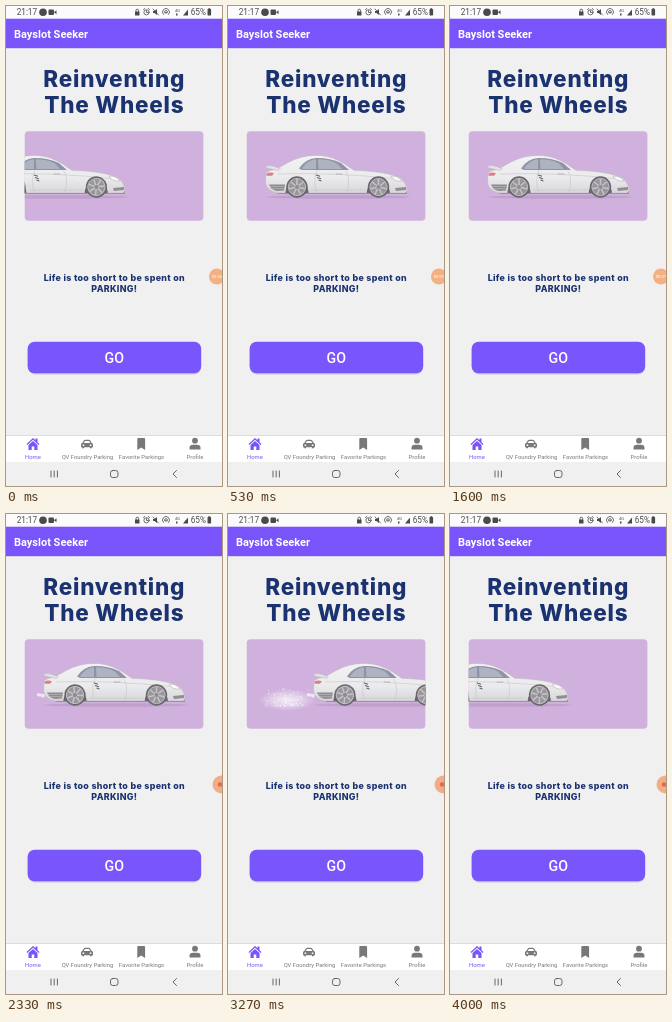
Write an HTML page that moves like this. It is 216 px wide and 480 px high and loops after 4.07 s.

```html
<!DOCTYPE html>
<html lang="en">
<head>
<meta charset="utf-8">
<title>Parking app</title>
<style>
  html, body { margin: 0; width: 100%; height: 100%; overflow: hidden; background: #f0f0f0; }
  svg { display: block; width: 100vw; height: 100vh; font-family: Roboto, sans-serif; }
  .heading { font-family: Inter, sans-serif; font-weight: 800; letter-spacing: .035em; fill: #1b3270; text-anchor: middle; }
  .tab { font-size: 5.9px; text-anchor: middle; }
  .line { fill: none; stroke-linecap: round; stroke-linejoin: round; }
</style>
</head>
<body>
<svg viewBox="0 0 216 480" preserveAspectRatio="none">
  <defs>
    <clipPath id="card"><rect x="18.700" y="125.200" width="178.700" height="89.600" rx="4"/></clipPath>
    <linearGradient id="paint" x2="0" y2="1">
      <stop offset="0" stop-color="#f3f2f3"/>
      <stop offset=".6" stop-color="#ebeaec"/>
      <stop offset="1" stop-color="#d8d6da"/>
    </linearGradient>
    <radialGradient id="haze">
      <stop offset="0" stop-color="#fff" stop-opacity=".75"/>
      <stop offset=".5" stop-color="#fff" stop-opacity=".4"/>
      <stop offset="1" stop-color="#fff" stop-opacity="0"/>
    </radialGradient>
    <g id="wheel">
      <circle r="10.700" fill="#69676c"/>
      <circle r="8.600" fill="#98969a" stroke="#bfbdc1" stroke-width="1"/>
      <g id="spokes" stroke="#c6c4c8" stroke-width="1.500"></g>
      <circle r="2" fill="#8d8b90"/>
    </g>
  </defs>

  <rect width="216" height="480" fill="#f0f0f0"/>

  <!-- Status bar -->
  <rect width="216" height="13" fill="#fbfbfb"/>
  <g fill="#4a4a4a" transform="translate(0 -.5)">
    <text x="10.700" y="9.500" font-size="8.200">21:17</text>
    <circle cx="37" cy="6.700" r="3.800"/>
    <rect x="42.500" y="4" width="5.500" height="5.500" rx="1"/>
    <path d="M48 6.700l2.500-2v4z"/>
    <rect x="129" y="6" width="4.500" height="4" rx=".6"/>
    <path d="M130 6v-1a1.300 1.300 0 0 1 2.600 0v1" class="line" stroke="#4a4a4a" stroke-width=".9"/>
    <g class="line" stroke="#4a4a4a" stroke-width=".8">
      <circle cx="140.500" cy="6.800" r="2.600"/>
      <path d="M140.500 5.200v1.800h1.200M137.500 4l1.300-1M143.500 4l-1.300-1"/>
      <path d="M147 3.500l5.500 6"/>
      <path d="M157.500 9a3.500 3.500 0 1 1 5 0M158.800 7.500a1.500 1.500 0 1 1 2.400 0"/>
    </g>
    <path d="M147 5.500h1.500l2.500-2v6l-2.500-2h-1.500z"/>
    <circle cx="160" cy="7.300" r=".8"/>
    <text x="169" y="6.500" font-size="4">4G</text>
    <path d="M170 8h1.500v2h-1.500zM177 10l5-6v6z"/>
    <text x="184.700" y="9.500" font-size="8.200">65%</text>
    <rect x="201.500" y="3.500" width="3.600" height="6.500" rx=".7"/>
    <rect x="202.400" y="2.700" width="1.800" height="1"/>
  </g>

  <!-- Header and headline -->
  <rect y="12.700" width="216" height="29.500" fill="#7854fa"/>
  <text x="8" y="32" font-size="11" font-weight="700" fill="#fff">Bayslot Seeker</text>
  <text class="heading" x="108.300" y="80.600" font-size="22.500">Reinventing</text>
  <text class="heading" x="108.300" y="107.200" font-size="22.500">The Wheels</text>

  <!-- Animated card -->
  <g clip-path="url(#card)">
    <rect x="18" y="125" width="180" height="90" fill="#d0b1dd"/>
    <g id="car">
      <ellipse cx="110" cy="191" rx="72" ry="1.800" fill="#8b6f99" opacity=".25"/>
      <g id="exhaust" fill="#f6edf4" opacity=".85">
        <ellipse cx="35" cy="181" rx="4" ry="1.500"/>
        <circle cx="32.500" cy="180.500" r="1.600"/>
        <circle cx="37" cy="182" r="1.700"/>
      </g>
      <path d="M47 184h131l1 4h-128q-3-1-4-4z" fill="#8b898f"/>
      <path d="M38 167Q41 164 48 163C57 159.500 66 150 87 149.500C104 149 114 156 126 164.300C144 165 164 167 173 172.500Q179 178 179 184L177.500 187H49Q39 185 37.500 177Z"
            fill="url(#paint)" stroke="#b7b4bb" stroke-width=".5"/>
      <path d="M37.500 160q4-1 9 .5l6 2.500-2 1.500-12-2.500z" fill="#e4e2e6" stroke="#b0adb4" stroke-width=".4"/>
      <path d="M71 162.500Q77 153 88 152Q101 151.500 113 157L121 164L74 164Z" fill="#8f93a5"/>
      <path d="M74 162Q80 154 88 153.300V163H75ZM90 153.300Q100 153 109 157.500L114 163H90.500Z" fill="#aeb3c1"/>
      <g class="line" stroke="#bfbdc3" stroke-width=".5">
        <path d="M89 164q-4 9-1 21M118 165q5 9 1 20M50 168q55-2 120 5M84 184h53"/>
        <path d="M108 168h6" stroke="#aaa8ae" stroke-width=".8"/>
      </g>
      <path d="M88 169l4 1.300M89 171.500l4 1.300M90.500 174l3 1" stroke="#65636a" stroke-width="1.200"/>
      <path d="M38.500 167.500q4-2 7.500 0l-2 2.300h-5.500z" fill="#de7f83"/>
      <path d="M41 178.500h16l-1 6-7 .5q-6-1-8-6.500z" fill="#8d8b91"/>
      <path d="M42 180.500h14M44 182.700h12" stroke="#c3c1c6" stroke-width=".6"/>
      <path d="M163 170q8 0 11 5-8 1-11-5z" fill="#fafafb" stroke="#a7a5ab" stroke-width=".5"/>
      <path d="M167 182l11-1v3l-10 1z" fill="#908e94"/>
      <path d="M57.500 187a11.500 12.500 0 0 1 23 0zM138.800 187a11.500 12.500 0 0 1 23 0z" fill="#69676c"/>
      <use id="rear" href="#wheel"/>
      <use id="front" href="#wheel"/>
    </g>
    <g id="dust"><ellipse cx="59" cy="186" rx="28" ry="11" fill="url(#haze)"/></g>
  </g>

  <text class="heading" x="108.300" y="275.200" font-size="8.900">Life is too short to be spent on</text>
  <text class="heading" x="108.300" y="285.900" font-size="8.900">PARKING!</text>

  <!-- Button -->
  <rect x="22" y="337.300" width="173" height="31.200" rx="7" fill="#777" opacity=".3"/>
  <rect x="21.600" y="335.700" width="173.600" height="31.500" rx="7" fill="#7955fc"/>
  <text x="108.300" y="357.400" font-size="14.200" font-weight="500" fill="#fff" text-anchor="middle">GO</text>

  <!-- Recorder bubble -->
  <g id="timer">
    <circle cx="211" cy="270.500" r="8" fill="#f3b183"/>
    <text id="seconds" x="205.700" y="272" font-size="4.200" fill="#fff"></text>
  </g>
  <g id="docked">
    <circle cx="215.500" cy="270.500" r="9" fill="#f3ad86"/>
    <circle cx="214" cy="270.500" r="2.200" fill="#e2694d"/>
  </g>

  <!-- Tabs -->
  <rect y="429" width="216" height="27" fill="#fff"/>
  <path d="M0 429.500h216" stroke="#d3d3d3" stroke-width=".8"/>
  <g fill="#7854fa">
    <path d="M20.500 438l6.500-6 2.500 2.300v-1.800h2v3.700l2 1.800-.8 1-5.700-5.200-5.700 5.200z"/>
    <path d="M22.500 439l4.500-4 4.500 4v5h-3.200v-3.500h-2.600v3.500h-3.200z"/>
    <text class="tab" x="27" y="453">Home</text>
  </g>
  <g fill="#78787b">
    <path fill-rule="evenodd" d="M75 438.300q0-1 1.300-1.300l1.500-2.500q.5-.8 1.500-.8h3.400q1 0 1.500.8l1.500 2.500q1.300.3 1.300 1.300v3h-1.200v1h-1.800v-1h-6v1h-1.800v-1h-1.200zM77.700 437h6.600l-1.200-1.900h-4.200zM76.600 438.500v1.400h1.600v-1.400zM83.800 438.500v1.400h1.600v-1.400z"/>
    <text class="tab" x="81.500" y="453">QV Foundry Parking</text>
    <path d="M131.300 433q0-1 1-1h5.800q1 0 1 1v11l-3.900-2.500-3.900 2.500z"/>
    <text class="tab" x="135.500" y="453">Favorite Parkings</text>
    <circle cx="189" cy="434.700" r="2.900"/>
    <path d="M183.500 443.500v-1.500q0-3.300 3.500-3.300h4q3.500 0 3.500 3.300v1.500z"/>
    <text class="tab" x="189" y="453">Profile</text>
  </g>

  <!-- System navigation -->
  <g class="line" stroke="#666">
    <path d="M45 465v6M48.200 465v6M51.400 465v6"/>
    <rect x="104.500" y="464.500" width="7.500" height="7" rx="2.300"/>
    <path d="M170.500 464.500l-3.500 3.500 3.500 3.500"/>
  </g>
</svg>

<script>
const LOOP = 4070, STEP = 1000 / 15;
const ENTER = 3730, STOP = 536, BURNOUT = 2130, LAUNCH = 2813;
const byId = id => document.getElementById(id);
const clamp = v => Math.max(0, Math.min(1, v));
const show = (id, on) => byId(id).setAttribute('visibility', on ? 'visible' : 'hidden');

function add(parent, tag, attrs) {
  const node = document.createElementNS('http://www.w3.org/2000/svg', tag);
  for (const key in attrs) node.setAttribute(key, attrs[key]);
  return parent.appendChild(node);
}

let seed = 17;
const random = () => (seed = seed * 16807 % 2147483647) / 2147483647;
random();

for (let i = 0; i < 7; i++)
  add(byId('spokes'), 'path', { d: 'M0 0V-8', transform: `rotate(${i * 360 / 7})` });

const specks = Array.from({ length: 170 }, () => ({
  birth: BURNOUT + 250 + random() * 1000,
  x: 33 + 25 * (random() + random()),
  y: 192 - 17 * random() ** 1.6,
  node: add(byId('dust'), 'circle', {
    r: (.3 + random() * .5).toFixed(2), fill: '#fff', opacity: (.25 + random() * .4).toFixed(2)
  })
}));

function carOffset(t) {
  if (t >= ENTER) return -61 * (1 - (t - 4000) / STOP) ** 2;
  if (t < STOP) return -61 * (1 - t / STOP) ** 2;
  return 2.288e-4 * Math.max(0, t - LAUNCH) ** 2;
}

function draw(t) {
  const x = carOffset(t);
  const burning = t >= BURNOUT && t < ENTER;
  const roll = x / 10.5 * 180 / Math.PI;
  const spin = burning ? (t - BURNOUT) * .7 : 0;
  byId('car').setAttribute('transform', `translate(${x})`);
  byId('rear').setAttribute('transform', `translate(69 181) rotate(${roll + spin})`);
  byId('front').setAttribute('transform', `translate(150.500 181) rotate(${roll})`);

  show('exhaust', burning);
  show('dust', burning);
  byId('dust').firstElementChild.setAttribute('opacity', clamp((t - BURNOUT - 200) / 800));
  for (const { birth, x, y, node } of specks) {
    const age = clamp((t - birth) / 350);
    const drift = 1 - (1 - age) ** 2;
    node.setAttribute('cx', 64 + (x - 64) * drift);
    node.setAttribute('cy', 191 + (y - 191) * drift);
    node.setAttribute('visibility', burning && age > 0 ? 'visible' : 'hidden');
  }

  byId('seconds').textContent = t < 400 ? '00:06' : '00:07';
  show('timer', t < 1730);
  show('docked', t >= 1730);
}

const start = performance.now();
function tick() {
  const t = (performance.now() - start) % LOOP;
  // Motion advances fifteen times a second; the last step lands on 4000 ms.
  draw(Math.min(4000, Math.floor((t + 4) / STEP) * STEP + 4));
  requestAnimationFrame(tick);
}
tick();
</script>
</body>
</html>
```
